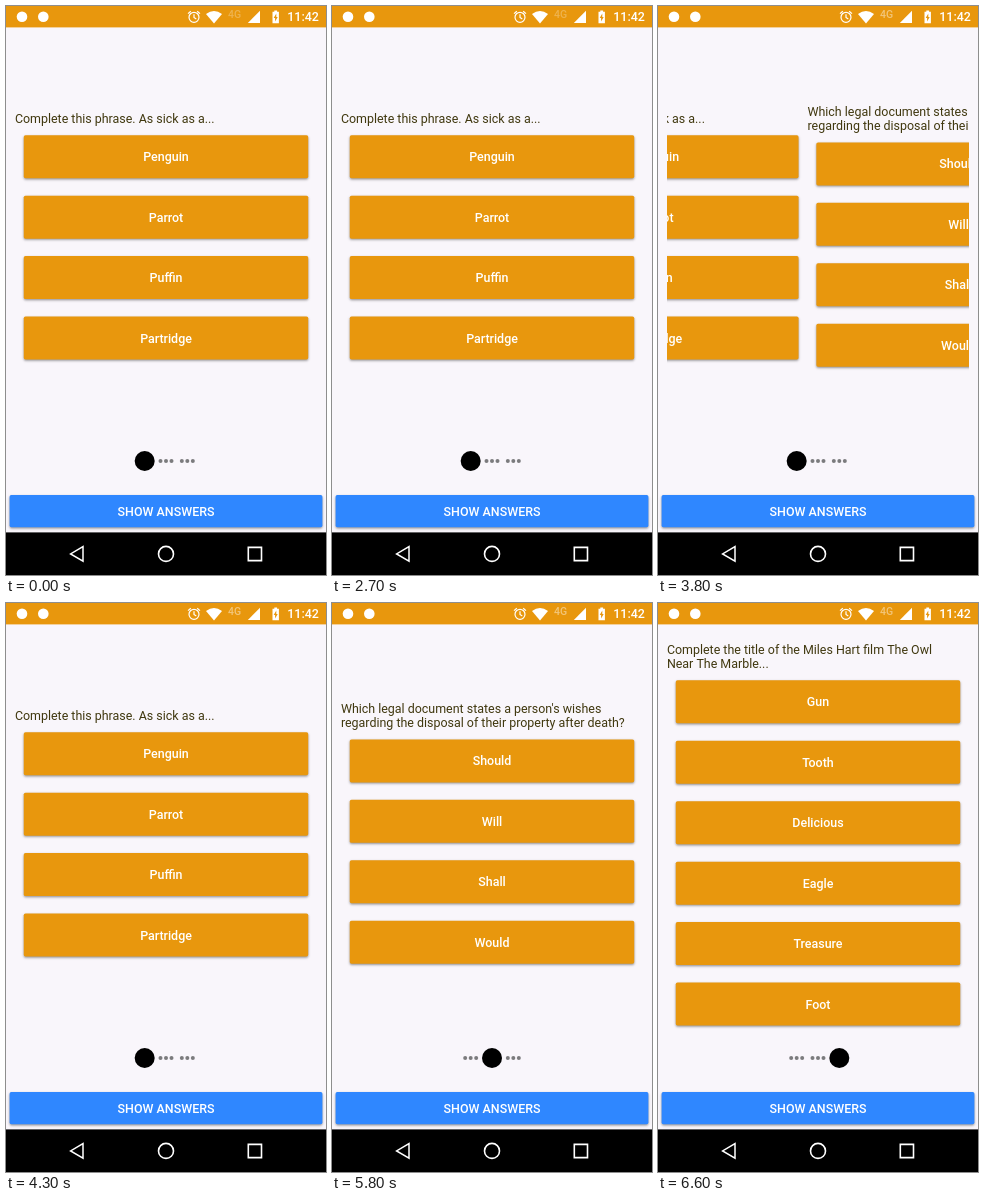
Recreate the animation shown at these times as an HTML page with a canvas. Size 320x569 px, loop 8000 ms.

```html
<!DOCTYPE html>
<html lang="en">
<head>
<meta charset="utf-8">
<title>Quiz pager</title>
<style>
  html, body { margin: 0; width: 100%; height: 100%; overflow: hidden; background: #f9f6fb; }
  canvas { display: block; width: 320px; height: 569px; }
</style>
</head>
<body>
<canvas id="stage"></canvas>
<script>
const W = 320, H = 569, LOOP = 8000, STEP = 100;
const EDGE = 8.89, PAGE_W = W - 2 * EDGE, PITCH = 60.45;
const ORANGE = '#e8970d', WHITE = '#fff';

const pages = [
  { top: 129.2, lines: ['Complete this phrase. As sick as a...'],
    answers: ['Penguin', 'Parrot', 'Puffin', 'Partridge'] },
  { top: 136.4, lines: ["Which legal document states a person's wishes", 'regarding the disposal of their property after death?'],
    answers: ['Should', 'Will', 'Shall', 'Would'] },
  { top: 77.3, lines: ['Complete the title of the Miles Hart film The Owl', 'Near The Marble...'],
    answers: ['Gun', 'Tooth', 'Delicious', 'Eagle', 'Treasure', 'Foot'] }
];

const easeOut = p => 1 - (1 - p) ** 2.5;
const easeInOut = p => p < .5 ? 4 * p ** 3 : 1 - 4 * (1 - p) ** 3;

// Pager moves: start, end, from page, to page, easing
const moves = [
  [2900, 3500, 0, .545, easeOut],
  [3700, 4300, .545, 0, easeInOut],
  [4700, 5000, 0, 1, easeInOut],
  [6200, 6600, 1, 2, easeInOut]
];

const canvas = document.getElementById('stage');
const ctx = canvas.getContext('2d');
const scale = window.devicePixelRatio || 1;
canvas.width = W * scale;
canvas.height = H * scale;

function pagerPosition(t) {
  let pos = 0;
  for (const [start, end, from, to, ease] of moves) {
    if (t >= start) pos = from + (to - from) * ease(Math.min(1, (t - start) / (end - start)));
  }
  return pos;
}

function text(str, x, y, color, weight = 400, align = 'left', size = 12.44) {
  ctx.font = `${weight} ${size}px Roboto, sans-serif`;
  ctx.textAlign = align;
  ctx.fillStyle = color;
  ctx.fillText(str, x, y);
}

function disc(x, y, r, color) {
  ctx.fillStyle = color;
  ctx.beginPath();
  ctx.arc(x, y, r, 0, 7);
  ctx.fill();
}

function shape(d, color) {
  ctx.fillStyle = color;
  ctx.fill(new Path2D(d));
}

function line(d, width) {
  ctx.strokeStyle = WHITE;
  ctx.lineWidth = width;
  ctx.stroke(new Path2D(d));
}

function button(x, y, w, h, color, label) {
  ctx.save();
  ctx.shadowColor = 'rgba(0,0,0,.4)';
  ctx.shadowBlur = 2.5 * scale;
  ctx.shadowOffsetY = 1.2 * scale;
  ctx.fillStyle = color;
  ctx.beginPath();
  ctx.roundRect(x, y, w, h, 1.7);
  ctx.fill();
  ctx.restore();
  text(label, x + w / 2, y + h / 2 + 4.5, WHITE, 500, 'center');
}

function drawPage({ top, lines, answers }, x) {
  lines.forEach((str, i) =>
    text(str, x, top - 12 - (lines.length - 1 - i) * 14.58, '#40380f'));
  answers.forEach((label, i) =>
    button(x + EDGE, top + i * PITCH, PAGE_W - 2 * EDGE, 43, ORANGE, label));
}

function drawPager(pos) {
  ctx.save();
  ctx.beginPath();
  ctx.rect(EDGE, 22, PAGE_W, 420);
  ctx.clip();
  pages.forEach((page, i) => {
    if (Math.abs(i - pos) < 1) drawPage(page, EDGE + (i - pos) * PAGE_W);
  });
  ctx.restore();
}

function drawIndicator(selected) {
  for (let i = 0; i < 3; i++) {
    const x = 138.67 + i * 21.33;
    if (i === selected) disc(x, 455, 10, '#000');
    else for (const dx of [-5.5, 0, 5.5]) disc(x + dx, 455, 2, '#7b7b7d');
  }
}

function drawStatusBar(t) {
  ctx.fillStyle = ORANGE;
  ctx.fillRect(0, 0, W, 21.4);
  disc(16, 10.8, 5.3, WHITE);
  disc(37.3, 10.8, 5.3, WHITE);
  line('M183 11.3a5 5 0 1 0 10 0a5 5 0 1 0-10 0M188 8.3v3.2l2.3 1.5M182 7.6l2.8-2.4M194 7.6l-2.8-2.4', 1.2);
  shape('M200 8Q208 2 216 8L208 17.4Z', WHITE);
  text('4G', 222, 11.6, `rgba(255,255,255,${t < 3000 ? .27 : .45})`, 500, 'left', 10.5);
  shape('M254 4.8V17H241.8Z', WHITE);
  shape('M266.5 5.8h1.8V4.5h2.8v1.3h1.8V17.2h-6.4Z', WHITE);
  shape('M270.3 7.6v3.3h1.4l-2.6 4.5v-3.4h-1.4Z', ORANGE);
  text('11:42', 281.3, 15.4, WHITE, 500);
}

function drawNavBar() {
  ctx.fillStyle = '#000';
  ctx.fillRect(0, 526.4, W, 43);
  line('M77 540.6V555.2L64.6 547.9Z', 1.5);
  line('M152.5 547.9a7.5 7.5 0 1 0 15 0a7.5 7.5 0 1 0-15 0', 1.6);
  line('M242.3 541.4h13.2v13.2h-13.2Z', 1.6);
}

function draw(now) {
  const t = Math.floor(now % LOOP / STEP) * STEP;
  ctx.setTransform(scale, 0, 0, scale, 0, 0);
  ctx.fillStyle = '#f9f6fb';
  ctx.fillRect(0, 0, W, H);
  drawPager(pagerPosition(t));
  drawIndicator(t < 4900 ? 0 : t < 6400 ? 1 : 2);
  button(3.6, 489, 312.8, 32.3, '#2f87ff', 'SHOW ANSWERS');
  drawStatusBar(t);
  drawNavBar();
}

const began = performance.now();
function frame() {
  draw(performance.now() - began);
  requestAnimationFrame(frame);
}
frame();
</script>
</body>
</html>
```
